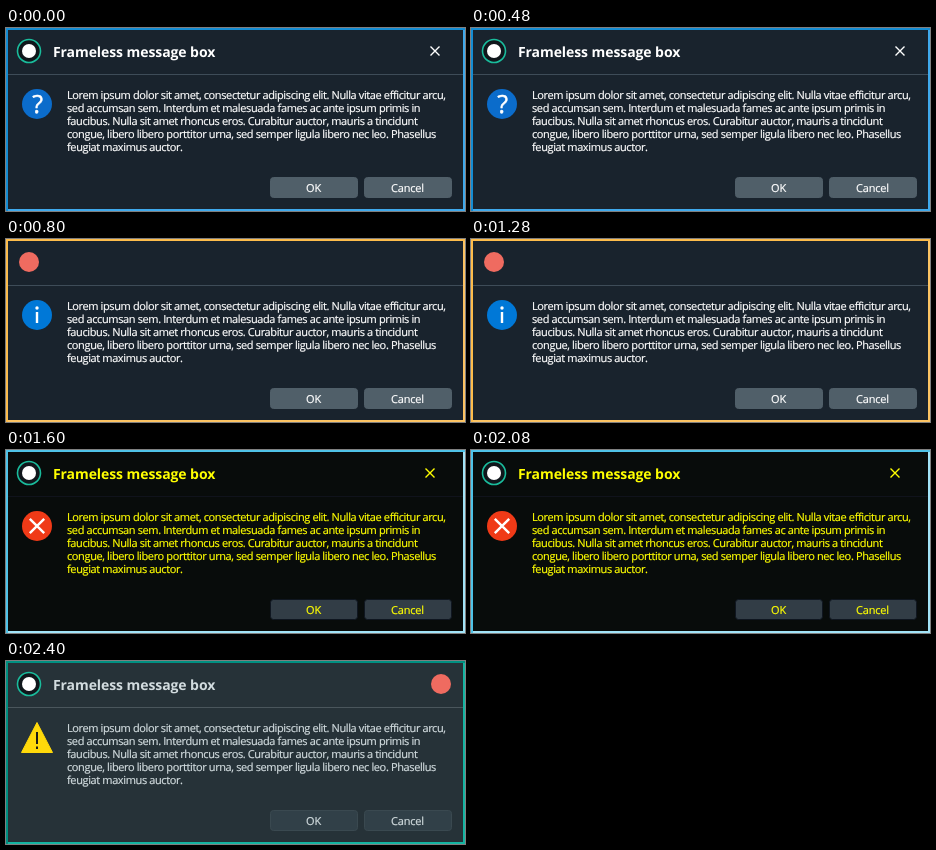
Recreate the animation shown at these times as an HTML page. Size 459 px wide and 183 px high, loop 3.2 s.

```html
<!DOCTYPE html>
<html lang="en">
<head>
<meta charset="utf-8">
<title>Frameless message box</title>
<style>
  html, body { margin: 0; width: 100%; height: 100%; overflow: hidden; background: #19232d; }
  svg { display: block; width: 459px; height: 183px; }
  text {
    font: 11px "Open Sans", "Noto Sans", sans-serif;
    letter-spacing: -.38px;
    text-rendering: geometricPrecision;
    fill: var(--ink);
    stroke: var(--ink);
    stroke-width: .2;
  }
  .title { font-size: 14px; font-weight: 700; letter-spacing: -.08px; stroke: none; }
  .label { text-anchor: middle; letter-spacing: -.2px; }
  .glyph { font-size: 25px; text-anchor: middle; letter-spacing: 0; fill: #fff; stroke: #fff; stroke-width: .5; }
  .back { fill: var(--back); }
  .edge { fill: none; stroke: var(--edge); stroke-width: 2; }
  .lit { fill: none; stroke: var(--lit); stroke-width: 2; }
  .rule { fill: var(--line); }
  .button { fill: var(--key); stroke: var(--rim); }
  .cross { fill: none; stroke: var(--ink); stroke-width: 1.4; }
  .dot { fill: #ef6b60; }

  .scene {
    visibility: hidden;
    animation: show 3.2s step-end calc(var(--i) * .8s - 3.2s) infinite;
  }
  @keyframes show {
    0% { visibility: visible; }
    25%, 100% { visibility: hidden; }
  }

  .dark { --back: #19232d; --line: #3e4c58; --key: #505f69; --rim: #505f69; --ink: #fff; }
  .blue { --i: 0; --edge: #148cd2; --lit: #3fa9ec; }
  .amber { --i: 1; --edge: #fdbc4b; --lit: #fdc463; }
  .contrast {
    --i: 2; --edge: #4fc3e8; --lit: #a2e4f8; --back: #080c0b; --line: #10131c;
    --key: #323d46; --rim: #0f1620; --ink: #ffff00;
  }
  .teal {
    --i: 3; --edge: #009081; --lit: #14b5a2; --back: #263238; --line: #4a565c;
    --key: #314048; --rim: #3a4950; --ink: #d2dcdf;
  }
</style>
</head>
<body>
<svg viewBox="0 0 459 183">
  <defs>
    <g id="box">
      <rect class="back" width="459" height="183"/>
      <path class="lit" d="M458 0V182H0"/>
      <path class="edge" d="M1 183V1H459"/>
      <rect class="rule" x="2" y="46" width="455" height="1"/>
      <text x="61" y="71">Lorem ipsum dolor sit amet, consectetur adipiscing elit. Nulla vitae efficitur arcu,</text>
      <text x="61" y="84">sed accumsan sem. Interdum et malesuada fames ac ante ipsum primis in</text>
      <text x="61" y="97">faucibus. Nulla sit amet rhoncus eros. Curabitur auctor, mauris a tincidunt</text>
      <text x="61" y="110">congue, libero libero porttitor urna, sed semper ligula libero nec leo. Phasellus</text>
      <text x="61" y="123">feugiat maximus auctor.</text>
      <rect class="button" x="264.5" y="149.5" width="87" height="20" rx="3"/>
      <rect class="button" x="358.5" y="149.5" width="87" height="20" rx="3"/>
      <text class="label" x="307.5" y="164">OK</text>
      <text class="label" x="401.5" y="164">Cancel</text>
    </g>
    <g id="head">
      <circle cx="23" cy="23" r="11.5" fill="#10161b" stroke="#1abc9c" stroke-width="1.6"/>
      <circle cx="23" cy="23" r="7" fill="#fff"/>
      <text class="title" x="47" y="29">Frameless message box</text>
    </g>
    <path id="cross" class="cross" d="M-4.5-4.5l9 9m0-9l-9 9"/>
    <circle id="dot" class="dot" r="10"/>
  </defs>

  <g class="scene dark blue">
    <use href="#box"/>
    <use href="#head"/>
    <use href="#cross" x="429" y="23"/>
    <circle cx="31" cy="76" r="15" fill="#0b6ccb"/>
    <text class="glyph" x="31.5" y="85">?</text>
  </g>

  <g class="scene dark amber">
    <use href="#box"/>
    <use href="#dot" x="23" y="23"/>
    <circle cx="31" cy="76" r="15" fill="#0078d7"/>
    <circle cx="31" cy="69" r="1.7" fill="#fff"/>
    <path d="M31 73v11" stroke="#fff" stroke-width="2.4"/>
  </g>

  <g class="scene contrast">
    <use href="#box"/>
    <use href="#head"/>
    <use href="#cross" x="424" y="23"/>
    <circle cx="31" cy="76" r="15" fill="#f03a17"/>
    <path d="M23.8 68.8l14.4 14.4m0-14.4l-14.4 14.4" stroke="#fff" stroke-width="2.4"/>
  </g>

  <g class="scene teal">
    <use href="#box"/>
    <use href="#head"/>
    <use href="#dot" x="435" y="23"/>
    <path d="M31 61.5L46.5 91.5H15.5Z" fill="#ffd90a" stroke="#ffd90a" stroke-linejoin="round"/>
    <path d="M31 71v12m0 2.5v2.5" stroke="#1a1a1a" stroke-width="2"/>
  </g>
</svg>
</body>
</html>
```
